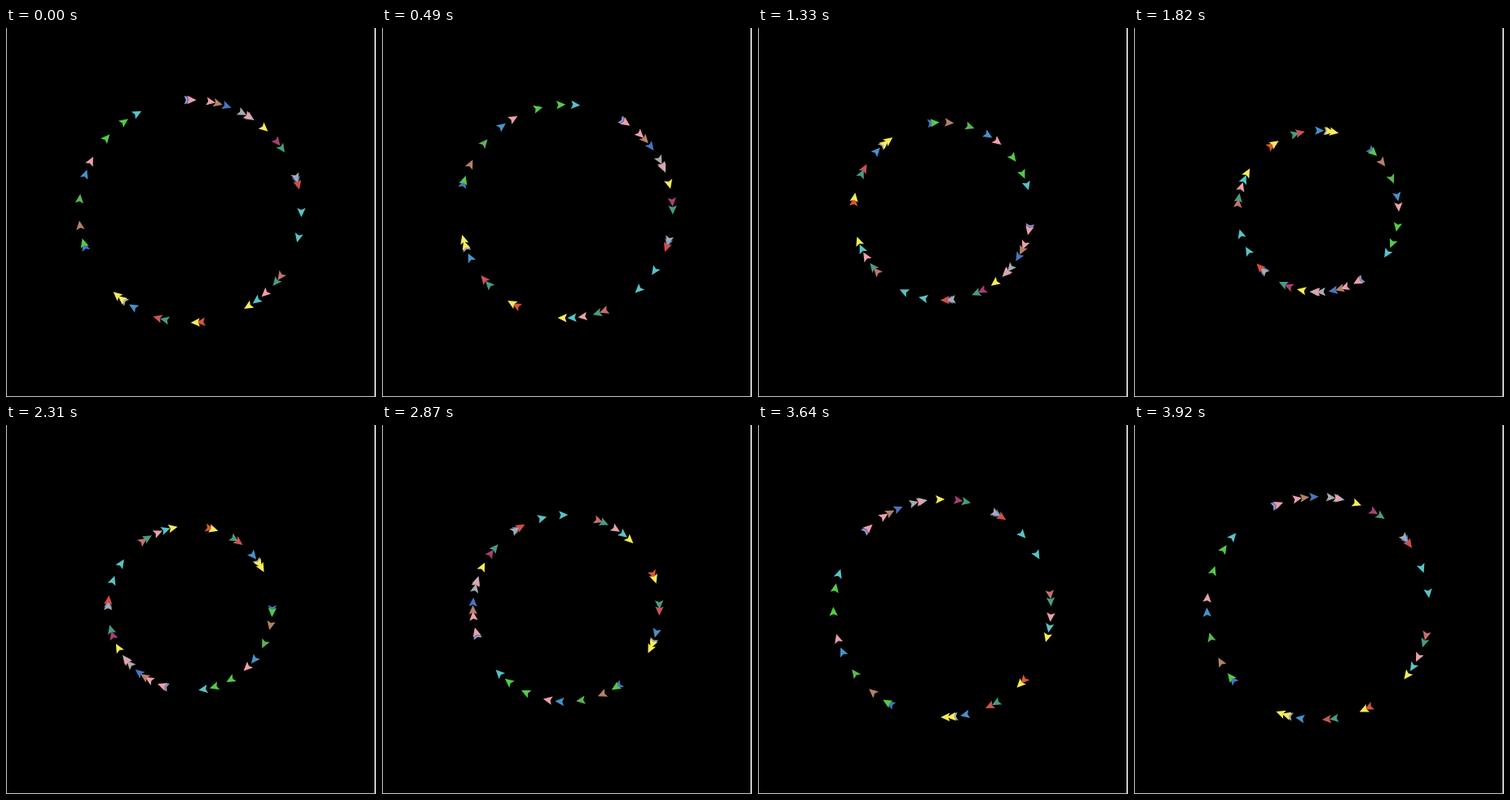
Animation of 454x452 px, one loop 3990 ms. Source, as an HTML page with a canvas:

```html
<!DOCTYPE html>
<html lang="en">
<head>
<meta charset="utf-8">
<title>Arrow ring</title>
<style>
  html, body { margin: 0; width: 100%; height: 100%; overflow: hidden; background: #000; }
  canvas { display: block; }
</style>
</head>
<body>
<canvas id="stage" width="454" height="452"></canvas>
<script>
const ctx = document.getElementById('stage').getContext('2d');
const STEP = 70, COUNT = 57, PERIOD = 60;
const CX = 226, CY = 224.5, RAD = Math.PI / 180;

const COLORS = {
  pink: '#eca0aa', purple: '#8a68b8', sky: '#8cb4d0', brown: '#b88068',
  blue: '#4a74c0', azure: '#4692cc', gray: '#a8aaae', mist: '#98b8b8',
  yellow: '#f6ec58', magenta: '#a83e74', teal: '#469c82', red: '#d84c3e',
  cyan: '#56c4c8', salmon: '#c4706a', orange: '#d8553a', coral: '#cc5450',
  lime: '#52cc44', green: '#5cb454'
};

// Place on the ring in degrees clockwise from the top, lower layers first.
const ARROWS = [
  ['sky', -0.9], ['purple', -0.2], ['pink', 0.7], ['pink', 10.6], ['brown', 14.4],
  ['blue', 19.2], ['gray', 27.9], ['mist', 32.7], ['pink', 31.7], ['yellow', 41.8],
  ['magenta', 51.5], ['teal', 55.7], ['blue', 74], ['gray', 72.4], ['red', 76.3],
  ['cyan', 90.5], ['cyan', 103.7], ['salmon', 125.7], ['teal', 129.5],
  ['pink', 137.6], ['cyan', 143.3], ['yellow', 148.5], ['orange', 174.4],
  ['yellow', 177.2], ['teal', 193.2], ['coral', 197], ['azure', 210.8],
  ['gray', 217], ['yellow', 218.1], ['yellow', 221.2], ['blue', 251.5],
  ['lime', 253.4], ['brown', 262.7], ['green', 276.4], ['azure', 289.4],
  ['pink', 296.8], ['lime', 311.2], ['lime', 323.6], ['cyan', 331.5]
];

// Both curves gain one full turn per period.
const KNOTS = [0, 13, 26, 33, 41, 52, 56];
const TURN = [0, 63.9, 150, 199.3, 254.5, 317, 338.5];
const PULSE = [12, 78, 163.5, 210.6, 261, 326, 350];

function curve(values) {
  const n = KNOTS.length;
  const at = (list, span, i) => {
    const lap = Math.floor(i / n);
    return list[i - lap * n] + lap * span;
  };
  const x = i => at(KNOTS, PERIOD, i);
  const y = i => at(values, 360, i);
  const slope = i => (y(i + 1) - y(i)) / (x(i + 1) - x(i));
  const tangent = i => {
    const before = x(i) - x(i - 1), after = x(i + 1) - x(i);
    return (slope(i - 1) * after + slope(i) * before) / (before + after);
  };
  return s => {
    let i = 0;
    while (x(i + 1) <= s) i++;
    const h = x(i + 1) - x(i), u = (s - x(i)) / h, v = 1 - u;
    return y(i) * v * v * (1 + 2 * u) + y(i + 1) * u * u * (3 - 2 * u)
      + h * u * v * (tangent(i) * v - tangent(i + 1) * u);
  };
}

const turn = curve(TURN), pulse = curve(PULSE);

const head = new Path2D('M6 0L-5.2 5.2L-3 0L-5.2 -5.2Z');

function drawBackdrop() {
  ctx.fillStyle = '#000';
  ctx.fillRect(0, 0, 454, 452);
  ctx.fillStyle = '#c8c8c8';
  ctx.fillRect(0, 0, 1, 452);
  ctx.fillRect(452, 0, 2, 452);
  ctx.fillRect(0, 451, 454, 1);
}

function draw(step) {
  const radius = 117.4 + 19.4 * Math.cos(pulse(step) * RAD);
  const spin = turn(step);
  drawBackdrop();
  for (const [color, place] of ARROWS) {
    ctx.save();
    ctx.translate(CX, CY);
    ctx.rotate((place + spin) * RAD);
    ctx.translate(0, -radius);
    ctx.fillStyle = COLORS[color];
    ctx.fill(head);
    ctx.restore();
  }
}

const start = performance.now();
function tick() {
  const t = performance.now() - start;
  draw(Math.floor(t / STEP) % COUNT);
  requestAnimationFrame(tick);
}
tick();
</script>
</body>
</html>
```
